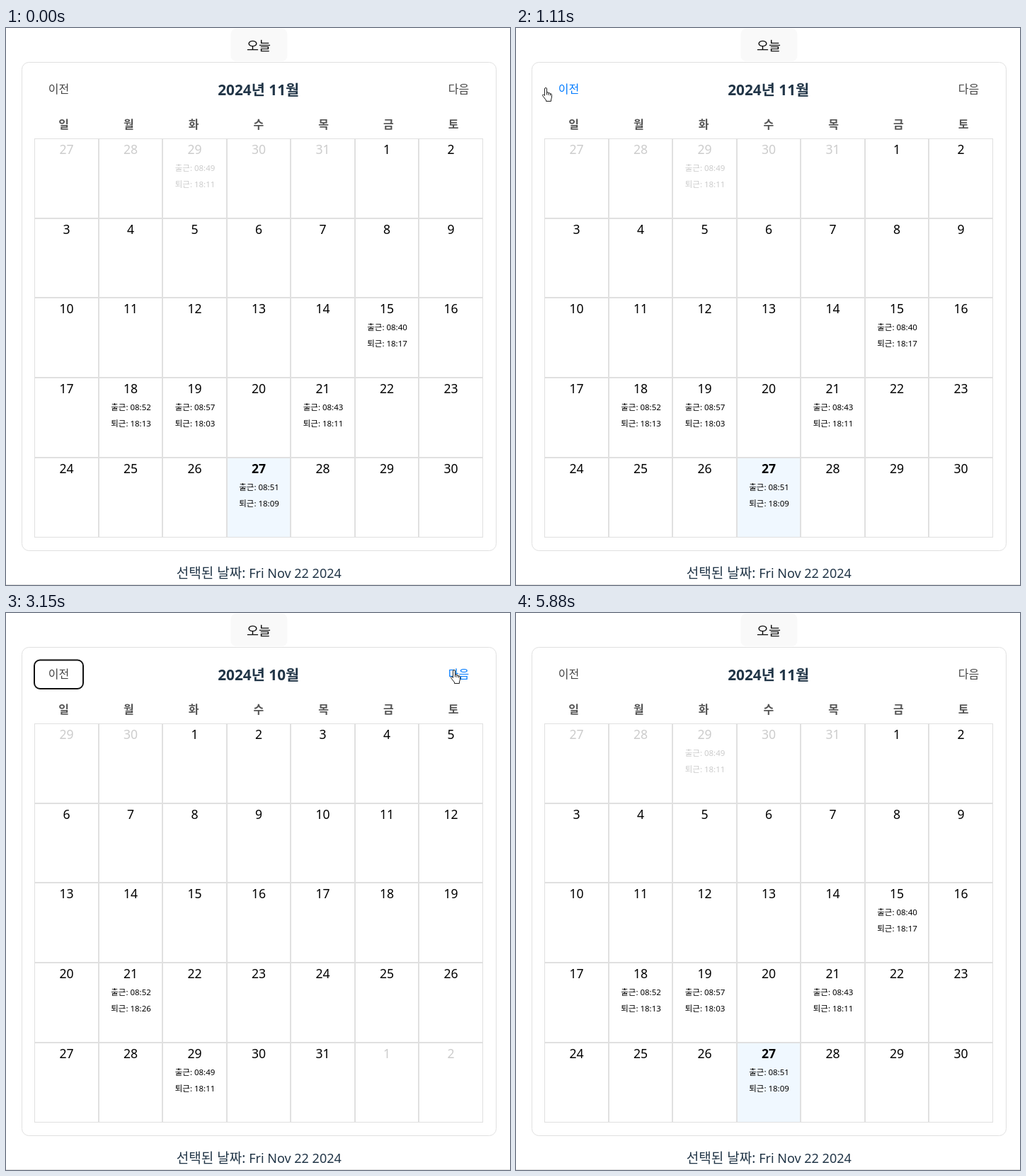
Animation of 712x787 px, one loop 5950 ms. Source, as an HTML page:

```html
<!DOCTYPE html>
<html lang="ko">
<head>
<meta charset="utf-8">
<title>Calendar</title>
<style>
html, body { margin: 0; width: 100%; height: 100%; overflow: hidden; background: #fff; }
svg { display: block; }
text { font-family: "Noto Sans", "Noto Sans CJK KR", sans-serif; text-anchor: middle; white-space: pre; }
</style>
</head>
<body>
<svg id="stage" width="712" height="787" viewBox="0 0 712 787"></svg>
<script>
const LOOP = 5950, TICK = 71;
const INK = '#213547', GRAY = '#444', BLUE = '#007bff', LINE = '#e0e0e0';
const GRID = { x: 40.3, y: 156, w: 90.5, h: 112.7, cols: 7, rows: 5 };
const stage = document.getElementById('stage');

function add(parent, tag, attrs, content) {
  const node = document.createElementNS('http://www.w3.org/2000/svg', tag);
  for (const key in attrs) node.setAttribute(key, attrs[key]);
  if (content !== undefined) node.textContent = content;
  parent.appendChild(node);
  return node;
}

function label(parent, x, y, size, fill, content, weight = 400) {
  return add(parent, 'text', { x, y, fill, 'font-size': size, 'font-weight': weight }, content);
}

const show = (node, on) => node.setAttribute('visibility', on ? 'visible' : 'hidden');
const within = (v, from, to) => v >= from && v < to;

// Clock-in and clock-out times by month-day
const records = {
  '10-21': ['08:52', '18:26'], '10-29': ['08:49', '18:11'],
  '11-15': ['08:40', '18:17'], '11-18': ['08:52', '18:13'],
  '11-19': ['08:57', '18:03'], '11-21': ['08:43', '18:11'],
  '11-27': ['08:51', '18:09']
};

const colX = c => Math.round(GRID.x + GRID.w * c);
const rowY = r => Math.round(GRID.y + GRID.h * r);

function buildMonth(month) {
  const group = add(stage, 'g', {});
  const offset = new Date(2024, month - 1, 1).getDay();
  const cells = [];
  label(group, 356.7, 94.5, 20.8, INK, `2024년 ${month}월`, 700);
  for (let i = 0; i < GRID.cols * GRID.rows; i++) {
    const c = i % GRID.cols, r = Math.floor(i / GRID.cols);
    const x = colX(c), y = rowY(r), mid = GRID.x + GRID.w * (c + 0.5);
    const date = new Date(2024, month - 1, 1 - offset + i);
    const key = `${date.getMonth() + 1}-${date.getDate()}`;
    const today = key === '11-27';
    const ink = date.getMonth() === month - 1 ? '#000' : '#ccc';
    const base = today ? '#f0f8ff' : '#fff';
    const rect = add(group, 'rect', {
      x: x + 0.5, y: y + 0.5, width: colX(c + 1) - x - 1, height: rowY(r + 1) - y - 1,
      fill: base, stroke: LINE
    });
    label(group, mid, y + 22, 17.6, ink, date.getDate(), today ? 700 : 400);
    (records[key] || []).forEach((time, n) =>
      label(group, mid + 0.5, y + 46 + 22.5 * n, 11.5, ink, `${n ? '퇴근' : '출근'}: ${time}`));
    cells.push({ rect, base });
  }
  return { group, cells };
}

function buildNav(x, width, name) {
  const text = label(stage, x + width / 2, 92.4, 16, GRAY, name);
  const ring = add(stage, 'rect', {
    x, y: 66.5, width, height: 40.5, rx: 8, fill: 'none', stroke: '#111', 'stroke-width': 2
  });
  return { x, width, text, ring };
}

add(stage, 'rect', { width: 712, height: 787, fill: '#fff' });
add(stage, 'rect', { x: 317.5, y: 1, width: 80, height: 46, rx: 8, fill: '#f9f9f9' });
label(stage, 357, 31.8, 18.5, '#111', '오늘');
add(stage, 'rect', { x: 22.5, y: 48.5, width: 670, height: 690, rx: 10, fill: '#fff', stroke: LINE });
[...'일월화수목금토'].forEach((day, i) => label(stage, 81.5 + 91.75 * i, 141.5, 16, '#555', day, 700));
const october = buildMonth(10), november = buildMonth(11);
const prev = buildNav(40, 69, '이전'), next = buildNav(605, 69, '다음');
const footer = label(stage, 357.3, 777.3, 19, INK, '선택된 날짜: ');
add(footer, 'tspan', { 'font-size': 18 }, 'Fri Nov 22 2024');
add(stage, 'rect', { y: 786, width: 712, height: 1, fill: LINE });

const glow = add(stage, 'circle', { r: 12.3, fill: '#fff438', 'fill-opacity': 0.75 });
const outline = { fill: '#fff', stroke: '#222', 'stroke-linejoin': 'round' };
const arrow = add(stage, 'path', {
  ...outline, d: 'M.5.5V13L3.3 10.4 5.4 15.3 7.4 14.4 5.3 9.6H9.4Z'
});
const hand = add(stage, 'path', {
  ...outline,
  d: 'M-1.5 11.5V2a1.5 1.5 0 0 1 3 0V7q2-1 2.5 1 2-1 2.5 1 2-.5 2 1.5V13q0 2-1 4v2.5H.5V18' +
     'L-4.5 11.5q0-3 3 0ZM1.5 7v3.5M4 8v3M6.5 9v2.5'
});

// Pointer glides along curves: moving from..to, visible until
const moves = [
  { from: 260, to: 830, until: 900, curve: [[661, 545], [569, 298], [341, 325], [2, 98]] },
  { from: 900, to: 1250, until: 2250, curve: [[0, 94], [22, 88], [50, 82], [66, 80]] },
  { from: 2250, to: 3150, until: 4820, ease: 2.55, curve: [[74, 80], [260, 73], [447, 73], [633, 80]] },
  { from: 4820, to: 4820, until: 4880, curve: [[657, 100], [657, 100], [657, 100], [657, 100]] },
  { from: 5340, to: 5610, until: 5680, curve: [[706, 771], [695, 730], [692, 708], [707, 730]] }
];

const mix = (a, b, u) => a.map((v, i) => v + (b[i] - v) * u);

function along(points, u) {
  while (points.length > 1) points = points.slice(1).map((p, i) => mix(points[i], p, u));
  return points[0];
}

// The pointer is sampled in even steps, so it hops rather than slides
function pointerAt(t) {
  const move = moves.find(m => within(t, m.from, m.until));
  if (!move) return null;
  const steps = Math.max(1, Math.round((move.to - move.from) / TICK));
  const size = (move.to - move.from) / steps || TICK;
  const u = Math.min(1, Math.floor((t - move.from + 5) / size) / steps);
  return along(move.curve, 1 - (1 - u) ** (move.ease || 1));
}

function cellAt([x, y]) {
  const c = Math.floor((x - GRID.x) / GRID.w), r = Math.floor((y - GRID.y) / GRID.h);
  return within(c, 0, GRID.cols) && within(r, 0, GRID.rows) ? r * GRID.cols + c : -1;
}

function render(t) {
  const pointer = pointerAt(t);
  const isOctober = within(t, 1650, 4290);
  const month = isOctober ? october : november;
  show(october.group, isOctober);
  show(november.group, !isOctober);

  const hit = pointer ? cellAt(pointer) : -1;
  month.cells.forEach(({ rect, base }, i) => rect.setAttribute('fill', i === hit ? LINE : base));

  let pointing = hit >= 0;
  for (const nav of [prev, next]) {
    const over = pointer && within(pointer[0], nav.x, nav.x + nav.width) && within(pointer[1], 66, 108);
    nav.text.setAttribute('fill', over ? BLUE : GRAY);
    pointing = pointing || over;
  }
  show(prev.ring, within(t, 1580, 4220));
  show(next.ring, within(t, 4220, 5880));

  show(hand, pointer && pointing);
  show(arrow, pointer && !pointing);
  show(glow, within(t, 1580, 1650) || within(t, 4220, 4290));
  if (pointer) {
    const [x, y] = pointer.map(Math.round);
    for (const node of [hand, arrow]) node.setAttribute('transform', `translate(${x} ${y})`);
    glow.setAttribute('cx', x - 0.5);
    glow.setAttribute('cy', y + 2.5);
  }
}

const start = performance.now();
function tick() {
  render((performance.now() - start) % LOOP);
  requestAnimationFrame(tick);
}
tick();
</script>
</body>
</html>
```
